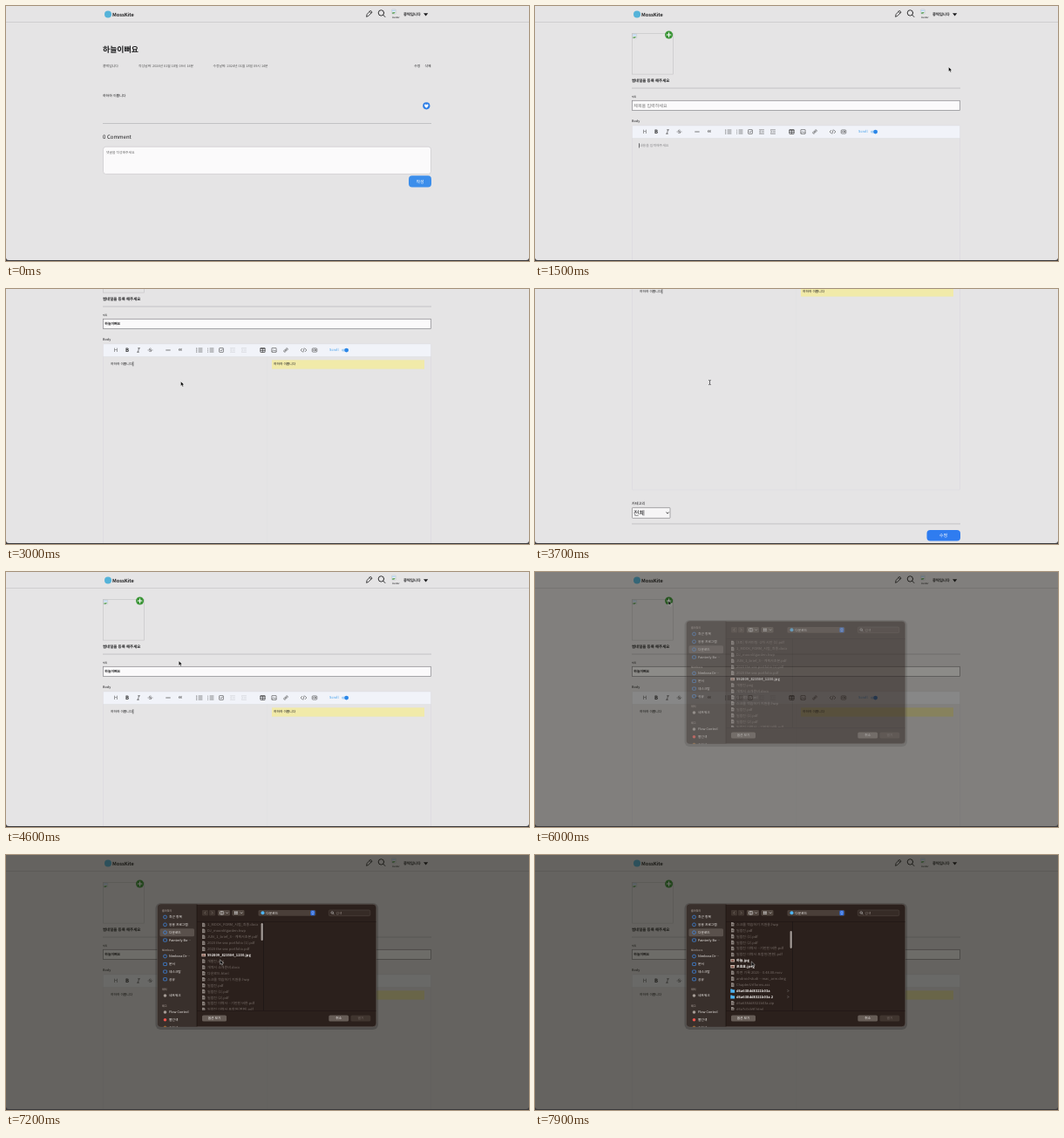
Animation, 600 px wide and 292 px high, one loop 8 s. Source, as an HTML page:

```html
<!DOCTYPE html>
<html lang="ko">
<head>
<meta charset="utf-8">
<title>Blog editor</title>
<style>
html, body { margin: 0; width: 100%; height: 100%; overflow: hidden; background: #e5e4e5; }
svg { display: block; width: 100vw; height: 100vh; }
text { font-family: 'Noto Sans CJK KR', 'Noto Sans', sans-serif; text-rendering: geometricPrecision; white-space: pre; }
</style>
</head>
<body>
<svg id="stage" viewBox="0 0 600 292" xmlns="http://www.w3.org/2000/svg"></svg>
<script>
const INK = '#1d1d1f', BLUE = '#2f7cf0', RULE = '#b4b3b6';
const USER = '콩떡입니다', TITLE = '하늘이뻐요', BODY = '하하하 이쁩니다';

// Drawing helpers; text is placed by its vertical centre.
const text = (x, y, size, str, fill = INK, weight = 400, anchor = 'start') =>
  `<text x="${x}" y="${y + size * .36}" font-size="${size}" fill="${fill}" font-weight="${weight}" text-anchor="${anchor}">${str}</text>`;
const box = (x, y, w, h, fill, r = 0, stroke = 'none', sw = .6) =>
  `<rect x="${x}" y="${y}" width="${w}" height="${h}" rx="${r}" fill="${fill}" stroke="${stroke}" stroke-width="${sw}"/>`;
const dot = (x, y, r, fill) => `<circle cx="${x}" cy="${y}" r="${r}" fill="${fill}"/>`;
const line = (d, stroke = INK, sw = .6, fill = 'none') =>
  `<path d="${d}" stroke="${stroke}" stroke-width="${sw}" fill="${fill}" stroke-linecap="round" stroke-linejoin="round"/>`;
const shape = (d, fill) => `<path d="${d}" fill="${fill}"/>`;
const group = (id, inner, attrs = '') => `<g id="${id}" ${attrs}>${inner}</g>`;
const at = (x, y, inner) => `<g transform="translate(${x} ${y})">${inner}</g>`;
const rule = y => box(111, y, 377, .7, RULE);

const broken = (x, y) => at(x, y,
  box(0, 0, 4.6, 5, '#f4f6f8', .3, '#a9b0b6', .4) +
  shape('M.4 .4H4.2V2.4Q2.4 1.4 .4 2.6Z', '#b9d5f0') +
  shape('M.4 4.7V3.6Q2 2.4 4.2 3.2L2.6 4.7Z', '#5d9f58'));

const header = () =>
  box(0, 18.2, 600, .7, '#c6c4c8') +
  dot(117, 9.5, 4, '#55b3d9') +
  text(122, 9.5, 5.6, 'MossKite', INK, 700) +
  line('M413.6 11.9L414.2 9.4L418.2 5.2L420.1 7L416 11.2ZM417 6.4L418.9 8.2', INK, .8) +
  line('M433.6 7.9A3.2 3.2 0 1 1 427.2 7.9A3.2 3.2 0 1 1 433.6 7.9M432.8 10.3L434.9 12.5', INK, .9) +
  broken(442.6, 4) + text(443, 12.6, 2.9, 'Avatar') +
  text(456, 9.5, 4.3, USER, INK, 700) +
  shape('M479 8.3H484.2L481.6 11.4Z', INK);

const post = () =>
  text(111, 50, 8.9, TITLE, INK, 700) +
  text(111, 69, 3.9, USER, '#444') +
  text(152, 69, 3.8, '작성날짜: 2024년 01월 18일 09시 14분', '#555') +
  text(237.5, 69, 3.8, '수정날짜: 2024년 01월 18일 09시 14분', '#555') +
  text(468.3, 69, 3.8, '수정', INK, 500) + text(480.5, 69, 3.8, '삭제', INK, 500) +
  text(111, 103, 3.95, BODY, INK, 500) +
  dot(482.3, 114.3, 4.1, '#2f7fe6') +
  shape('M482.3 116.7C478.4 114 480.4 111.3 482.3 113C484.2 111.3 486.2 114 482.3 116.7Z', '#fff') +
  rule(134) +
  text(111, 149.5, 6, '0 Comment', INK, 500) +
  box(111.5, 161.2, 376, 31.2, '#fbfafb', 3, '#c3c2c5') +
  text(115, 167.2, 3.8, '댓글을 작성해주세요', '#666') +
  box(462, 194.2, 26, 13.3, '#3c8eeb', 4) +
  text(475, 200.8, 5, '작성', '#fff', 500, 'middle');

const list3 = 'M0 -2H4M0 0H4M0 2H4';
const indent = dir => line(`M-2.5 -2.2H2.5M0 0H2.5M-2.5 2.2H2.5M${dir < 0 ? '-1.3 -1L-2.5 0L-1.3 1' : '-2.5 -1L-1.3 0L-2.5 1'}`, '#555', .6);
const tools = () => [
  [126, text(0, 0, 6, 'H', '#555', 400, 'middle')],
  [139, text(0, 0, 6, 'B', '#222', 800, 'middle')],
  [152, line('M-.6 -2.2H1.6M-1.6 2.2H.6M.6 -2.2L-.6 2.2', '#444')],
  [165.5, text(0, 0, 5.8, 'S', '#555', 400, 'middle') + line('M-2.6 0H2.6', '#555', .5)],
  [186, line('M-2.3 0H2.3', '#444', .7)],
  [200, text(0, 1.6, 8, '“', '#444', 700, 'middle')],
  [221, line(list3, '#444') + [-2, 0, 2].map(y => dot(-2.3, y, .6, '#444')).join('')],
  [234, line(list3, '#444') + [-2, 0, 2].map((y, i) => text(-3, y, 2.3, i + 1, '#444')).join('')],
  [247, box(-2.4, -2.4, 4.8, 4.8, 'none', .5, '#444') + line('M-1.2 0L-.2 1L1.4 -1', '#444')],
  [294.5, box(-2.6, -2.4, 5.2, 4.8, 'none', .2, '#333', .7) + line('M-2.6 -1.6H2.6M-2.6 .5H2.6M0 -1.6V2.4', '#333', .6)],
  [307.5, box(-2.6, -2.4, 5.2, 4.8, 'none', .3, '#444') + line('M-2.4 1.7L-.8 -.2L.5 1.1L1.4 .2L2.5 1.5', '#444', .5)],
  [321, line('M-.4 -1L.9 -2.2Q2.6 -2.4 2.2 -.7L.9 .6M.4 1L-.9 2.2Q-2.6 2.4 -2.2 .7L-.9 -.6M-.7 .7L.7 -.7', '#444')],
  [341.5, line('M-1.7 -1.7L-3.4 0L-1.7 1.7M1.7 -1.7L3.4 0L1.7 1.7M.6 -2.2L-.6 2.2', '#444')],
  [354, box(-2.8, -2.1, 5.6, 4.2, 'none', 1, '#444') + text(0, 0, 3, 'CB', '#444', 600, 'middle')]
].map(([x, art]) => at(x, 144, art)).join('');

const editor = () =>
  box(111.5, 31.3, 46.8, 46.8, 'none', 0, '#c2c1c4') + broken(112, 32) +
  dot(153.6, 33, 4.5, '#3c9638') + line('M151.3 33H155.9M153.6 30.7V35.3', '#fff', 1.1) +
  text(111, 85, 4.45, '썸네일을 등록 해주세요', INK, 600) +
  rule(93.7) +
  text(111, 103.5, 2.8, '제목') +
  box(111.5, 108.3, 376, 11.2, '#fbfafb', 0, '#87868b', .7) +
  text(111, 132, 3.8, 'Body', INK, 500) +
  box(111.5, 137, 376, 250, 'none', 1, '#d6d5dc', .5) +
  box(111.7, 137.2, 375.6, 14, '#f1f3f9') + box(111.5, 151.2, 376, .4, '#dddfe7') +
  tools() + group('indents', at(260, 144, indent(-1)) + at(273, 144, indent(1))) +
  text(371, 144, 4, 'Scroll', '#3b9bea') +
  box(385, 142.8, 8, 2.6, '#a9d1f5', 1.3) + dot(390.6, 144.1, 2.4, '#2b86e8') +
  group('empty',
    text(113.3, 113.9, 5, '제목을 입력하세요', '#757575') +
    text(120, 159.8, 3.9, '내용을 입력해주세요', '#8b8a8d')) +
  group('filled',
    text(113.3, 113.9, 3.9, TITLE, INK, 600) +
    text(120, 160, 3.75, BODY, INK, 500) +
    box(299.3, 151.5, .4, 235, '#dfdde1') +
    box(305, 155.3, 175, 10.3, '#f1eaa9') +
    text(307, 160, 3.75, BODY, INK, 500)) +
  box(0, 157.2, .6, 5.2, INK).replace('<rect', '<rect id="caret"') +
  text(111, 402.3, 4.2, '카테고리', INK, 500) +
  box(111.5, 407.4, 43.5, 12, '#f6f5f6', .6, '#77767a') +
  text(113, 413.4, 7, '전체', INK, 500) +
  line('M150.8 412.8L152.1 414.2L153.4 412.8', INK, .8) +
  rule(425.6) +
  box(449.5, 433, 38.5, 12.6, BLUE, 4) +
  text(468.5, 439.3, 5.2, '수정', '#fff', 500, 'middle');

// Sidebar: [y, label, kind]
const places = [
  [64, '즐겨찾기'], [71, '최근 항목', 'o'], [79.8, '응용 프로그램', 'o'], [88.7, '다운로드', 'o'], [97.5, 'Painterly Bo…', 'b'],
  [108.8, 'Nimbora'], [116, 'Nimbora Dr…', 'o'], [125, '문서', 'b'], [133.6, '데스크탑', 'b'], [142.3, '공유', 'b'],
  [153.8, '위치'], [161, '네트워크', '#a59c96'],
  [172.8, '태그'], [180, 'Flow Control', '#a59c96'], [188.8, '빨간색', '#f0544c'], [197.5, '주황색', '#f09a3c']
];
const place = ([y, label, kind]) => {
  if (!kind) return text(179, y, 3.1, label, '#968c86', 600);
  const icon = kind === 'o' ? `<circle cx="182.5" cy="${y}" r="1.9" fill="none" stroke="#3f8ef0" stroke-width=".7"/>`
    : kind === 'b' ? box(180.6, y - 1.6, 3.9, 3.2, 'none', .5, '#3f8ef0', .7) : dot(182.5, y, 1.8, kind);
  return icon + text(187, y, 3.75, label, '#eeeae7', 500);
};

const files = ['[3조] 투커미팅 -2차 시안 (1).pdf', '1_MOCK_FORM_시험_최종.docx', 'DJ_moonlitgarden.hwp', 'JUN_1_brief_3…계획서초본.pdf',
  '2020 the sea portfolio (1).pdf', '2020 the sea portfolio.pdf', '592809_823504_1230.jpg', '개발진.png', '개역서 소개준비.docx', '다운로드.html',
  '스크롤 학습하기 지원용.hwp', '일람진.pdf', '일람진 (1).pdf', '일람진 (2).pdf', '일람진 이력서…기반된 버튼.pdf', '일람진 이력서 포함된(변환).pdf',
  '하늘.jpg', '포효효.jpeg', '화면 기록 2023…3.48.08.mov', 'android-studi…mac_arm.dmg', 'ChapterUrlforms.ass',
  'd6a638dd8321b03a', 'd6a638dd8321b03a 2', 'd6a638dd8321b03a.zip', 'd6a7c0cb9f.html', 'diagram.drawio', 'notes.md'];
const file = (name, i) => {
  const y = 81 + i * 6.93, folder = !name.includes('.'), photo = /jpe?g$/.test(name), live = folder || photo;
  const icon = folder ? shape(`M224.3 ${y - 2}h1.8l.6 .7h2.4v3.4h-4.8Z`, '#4eb4f2')
    : photo ? box(224.4, y - 1.7, 4.6, 3.4, '#d8c4b8', .2) + box(225.2, y - .9, 3, 1.9, '#8c5f55')
    : shape(`M225 ${y - 2.3}h2.2l1.2 1.2v3.4h-3.4Z`, '#8b827d') + box(225.7, y - .3, 2, 1, '#5c524d');
  return icon + text(231, y, 4, name, live ? '#f5f2f0' : '#756b66', live ? 600 : 400) +
    (folder ? line(`M290 ${y - .9}L290.9 ${y}L290 ${y + .9}`, '#aaa', .5) : '');
};

const pill = (x, w, label, fill, ink) => box(x, 183.5, w, 7, fill, 1.6) + text(x + w / 2, 187, 3.7, label, ink, 500, 'middle');
const dialog = () =>
  box(171.5, 55, 255.5, 145, '#0003', 6) +
  box(173.7, 56.2, 251.2, 140.6, '#2b201c', 4, '#6d6662', .5) +
  '<clipPath id="frame"><rect x="174" y="56.5" width="250.6" height="140" rx="3.8"/></clipPath>' +
  '<clipPath id="pane"><rect x="219" y="76.3" width="76" height="101.5"/></clipPath>' +
  group('side', box(174, 56, 44.8, 141, '#39302c') + box(218.8, 56, .5, 141, '#17100d') +
    box(176.5, 84.2, 39.5, 9, '#5a514c', 1.5) + places.map(place).join(''), 'clip-path="url(#frame)"') +
  box(225, 63, 7, 6.6, '#40352f', 1) + box(233, 63, 7, 6.6, '#40352f', 1) +
  line('M229 65L227.8 66.3L229 67.6M236 65L237.2 66.3L236 67.6', '#81766f', .6) +
  [243, 259.5].map(x => box(x, 63, 14, 6.6, '#51463f', 1.4) + line(`M${x + 9.6} 65.8l1 1l1 -1`, '#ddd', .6)).join('') +
  box(245.5, 64.7, 4.2, 3.3, 'none', .4, '#ddd', .6) + line('M247.6 64.7V68', '#ddd', .5) +
  [0, 1, 2, 3].map(i => box(262 + i % 2 * 2.2, 64.7 + (i >> 1) * 1.9, 1.5, 1.3, '#ddd')).join('') +
  box(289.5, 63, 66, 6.7, '#4a3f39', 1.5) +
  dot(294.5, 66.3, 2, '#4eb4f2') + text(298.3, 66.3, 3.8, '다운로드', '#f1eeec', 500) +
  box(349.4, 63.5, 5, 5.7, '#2b6be0', 1.2) + line('M350.9 65.7l1 -1l1 1M350.9 67l1 1l1 -1', '#fff', .5) +
  box(370.3, 63, 47.5, 6.7, '#362b26', 1.5, '#5d534d', .4) +
  line('M375.5 66A1.3 1.3 0 1 1 372.9 66A1.3 1.3 0 1 1 375.5 66M375.2 67L376.2 68', '#ccc', .5) +
  text(378.5, 66.3, 3.7, '검색', '#8e847e') +
  box(219, 76, 205.6, .4, '#171110') + box(295.3, 76, .5, 102, '#171110') + box(219, 178, 205.6, .4, '#171110') +
  `<g clip-path="url(#pane)">${group('files', files.map(file).join(''))}</g>` +
  box(292.6, 77, 2.2, 20, '#a39b97', 1.1).replace('<rect', '<rect id="thumb"') +
  pill(225, 28, '옵션 보기', '#665c56', '#f5f2f0') +
  pill(370.3, 22.8, '취소', '#665c56', '#f5f2f0') + pill(395.5, 22.8, '열기', '#40352f', '#756b66');

document.getElementById('stage').innerHTML =
  box(0, 0, 600, 292, '#e5e4e5') +
  group('page', header() + group('post', post()) + group('editor', editor())) +
  box(0, 0, 600, 292, '#14120c').replace('<rect', '<rect id="dim"') +
  group('dialog', dialog()) +
  shape('M0 288.5Q.3 291 3 291H597Q599.7 291 600 288.5V292H0Z', '#3a393b') +
  group('arrow', line('M0 0V5L1.2 4L2.1 6L3 5.6L2.2 3.7L3.7 3.6Z', '#f4f4f4', .4, '#0b0b0b')) +
  group('beam', line('M-.9 -2.6Q0 -2.6 0 -2V2Q0 2.6 -.9 2.6M.9 -2.6Q0 -2.6 0 -2M0 2Q0 2.6 .9 2.6', INK, .6));

// Tracks: rows of [time, values...], linear between rows.
const cursorTrack = [[100, 384, 132], [200, 510, 188], [300, 510, 188], [500, 509, 198], [800, 492, 130], [1000, 479, 84], [1200, 474.5, 70],
  [1800, 474.5, 70], [2000, 430, 80], [2300, 270, 101], [2600, 200.5, 106], [4500, 200.5, 106], [4700, 196, 98], [5100, 168, 52],
  [5400, 153.5, 36], [5700, 153, 33], [6200, 153, 33], [6500, 185, 65], [7000, 240, 116], [7300, 248.3, 122.3]];
const scrollTrack = [[2700, 0], [2800, 14], [3000, 74], [3300, 135], [3600, 157], [3700, 157], [4000, 92], [4300, 22], [4500, 0]];
const dimTrack = [[5800, 0], [5900, .22], [6000, .48], [6100, .61]];
const sheetTrack = [[5900, 0], [6000, .5], [6100, 1]];
const listTrack = [[7100, 0], [7300, 16], [7500, 46], [7700, 65], [7900, 71]];

function sample(track, t) {
  const i = track.findIndex(row => row[0] > t);
  if (i === 0) return track[0].slice(1);
  if (i < 0) return track[track.length - 1].slice(1);
  const a = track[i - 1], b = track[i], k = (t - a[0]) / (b[0] - a[0]);
  return a.slice(1).map((v, j) => v + (b[j + 1] - v) * k);
}

const el = id => document.getElementById(id);
const set = (id, name, value) => el(id).setAttribute(name, value);
const show = (id, on) => set(id, 'opacity', +on);

function draw(now) {
  const t = Math.floor(now % 8000 / 100) * 100;
  const editing = t >= 1500, loaded = t >= 1600;
  const [x, y] = sample(cursorTrack, t), [scroll] = sample(scrollTrack, t), [list] = sample(listTrack, t);
  const overText = t >= 3700 && t < 4300;

  set('page', 'transform', `translate(0 ${-scroll})`);
  show('post', !editing);
  show('editor', editing);
  show('empty', !loaded);
  show('filled', loaded);
  set('indents', 'opacity', loaded ? .25 : 1);
  set('caret', 'x', loaded ? 145.6 : 119.4);
  show('caret', t < 5900 && (!loaded || (t + 450) % 1000 < 500));

  set('dim', 'opacity', sample(dimTrack, t)[0]);
  set('dialog', 'opacity', sample(sheetTrack, t)[0]);
  set('files', 'transform', `translate(0 ${-list})`);
  set('thumb', 'y', 77 + list * .14);
  show('thumb', list > 0);

  for (const id of ['arrow', 'beam']) set(id, 'transform', `translate(${x} ${y + (id === 'beam')})`);
  show('arrow', t >= 100 && !overText);
  show('beam', overText);
}

const start = performance.now();
function tick() {
  draw(performance.now() - start);
  requestAnimationFrame(tick);
}
tick();
</script>
</body>
</html>
```
